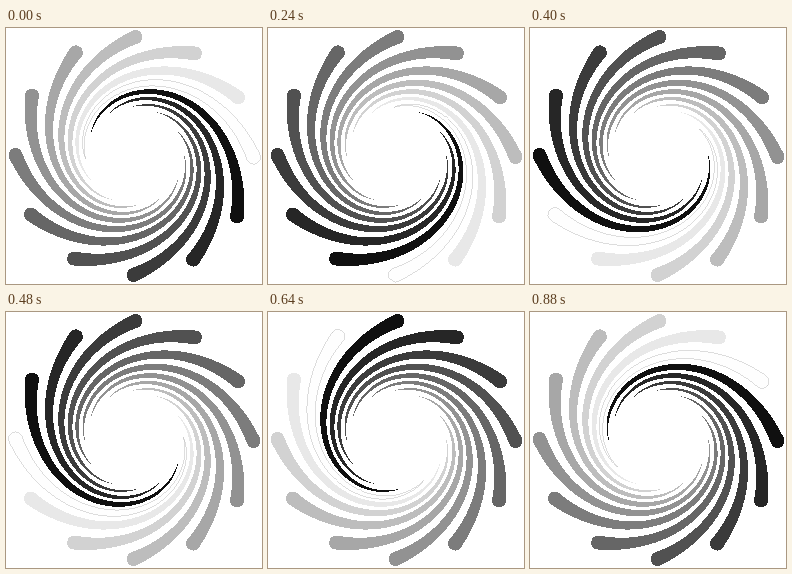
An HTML page that plays this animation: 256x256 px, repeating every 920 ms.

```html
<!DOCTYPE html>
<html lang="en">
<head>
<meta charset="utf-8">
<title>Spiral spinner</title>
<style>
  html, body { margin: 0; width: 100%; height: 100%; overflow: hidden; background: #fff; }
  svg { display: block; width: 100vw; height: 100vh; }
</style>
</head>
<body>
<svg id="stage" viewBox="0 0 256 256"></svg>
<script>
const ARMS = 12, STEP = 80, LOOP = 920;
const CENTER = [128.5, 128];
const SWEEP = 184 * Math.PI / 180;
const SAMPLES = 60;

// Along one arm, u runs from the tail (0) to the head (1)
const radius = u => 49 + 39 * u + 31 * u ** 4;
const halfWidth = u => 4.6 * u ** 0.75 + 2.4 * u ** 8;

function spine(u) {
  const a = (u - 1) * SWEEP, r = radius(u);
  return [r * Math.cos(a), r * Math.sin(a)];
}

// Point on the arm's edge: side 1 is outer, -1 is inner
function edge(u, side) {
  const [x, y] = spine(u);
  const [x0, y0] = spine(u - 0.001), [x1, y1] = spine(u + 0.001);
  const dx = x1 - x0, dy = y1 - y0;
  const k = side * halfWidth(u) / Math.hypot(dx, dy);
  return `${(x + dy * k).toFixed(2)} ${(y - dx * k).toFixed(2)}`;
}

const steps = Array.from({ length: SAMPLES + 1 }, (_, i) => i / SAMPLES);
const outer = steps.map(u => edge(u, 1));
const inner = steps.map(u => edge(u, -1)).reverse();
const cap = halfWidth(1);
const armPath = `M${outer.join('L')}A${cap} ${cap} 0 0 1 ${inner.join('L')}Z`;

const stage = document.getElementById('stage');
const arms = Array.from({ length: ARMS }, (_, i) => {
  const path = document.createElementNS('http://www.w3.org/2000/svg', 'path');
  path.setAttribute('d', armPath);
  path.setAttribute('transform', `translate(${CENTER}) rotate(${30.5 + i * 360 / ARMS})`);
  path.setAttribute('shape-rendering', 'crispEdges');
  path.setAttribute('stroke-width', 0.5);
  stage.append(path);
  return path;
});

function paint(step) {
  arms.forEach((arm, i) => {
    const rank = (i - step + ARMS) % ARMS;
    const v = Math.round(16 + rank * 21.6);
    arm.setAttribute('fill', `rgb(${v},${v},${v})`);
    arm.setAttribute('stroke', rank === ARMS - 1 ? '#bbb' : 'none');
  });
}

let shown = -1;
function tick() {
  const step = Math.floor(performance.now() % LOOP / STEP);
  if (step !== shown) paint(shown = step);
  requestAnimationFrame(tick);
}
tick();
</script>
</body>
</html>
```
